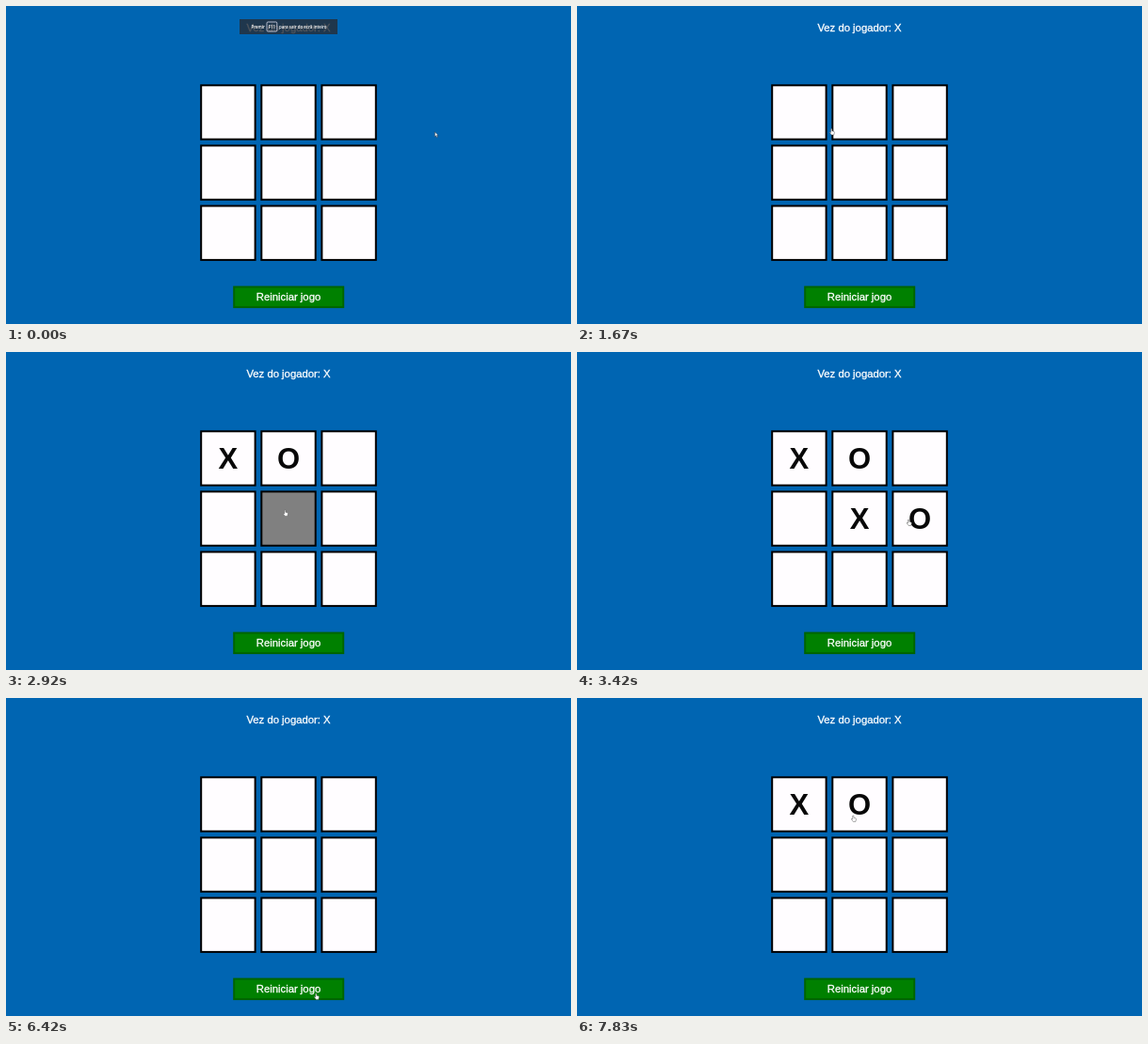
Recreate the animation shown at these times as an HTML page with a canvas. Size 600 px wide and 338 px high, loop 8 s.

```html
<!DOCTYPE html>
<html lang="pt">
<head>
<meta charset="utf-8">
<title>Jogo do galo</title>
<style>
  html, body { margin: 0; width: 100%; height: 100%; overflow: hidden; background: #0065b2; }
  canvas { display: block; width: 600px; height: 338px; }
</style>
</head>
<body>
<canvas id="stage" width="600" height="338"></canvas>
<script>
const ctx = document.getElementById('stage').getContext('2d');
const LOOP = 8000;
const STEP = 1000 / 12;
const TRAVEL = 300;
const SANS = '"Liberation Sans", Arial, sans-serif';
const LABEL = '11.3px ' + SANS;
const MARK = 'bold 31px ' + SANS;
const TOAST = '600 4.4px "Open Sans", sans-serif';

// The pointer glides to a spot, pauses there and clicks.
const visit = (x, y, arrive, pause = 125) => ({ x, y, arrive, click: arrive + pause });
const start = { x: 457, y: 137, click: 0 };
const visits = [
  visit(238, 133, 1783),
  visit(294, 128, 2250),
  visit(297, 171, 2900),
  visit(351, 174, 3250),
  visit(368, 240, 3700, 460),
  visit(330, 317, 6250),
  visit(238, 133, 7083),
  visit(294, 128, 7417)
];

const inside = (p, r) => p.x >= r.x && p.x <= r.x + r.w && p.y >= r.y && p.y <= r.y + r.h;

// The winning message pushes the board and the button down.
function layout(won) {
  const top = won ? 88.3 : 83.3;
  const cells = Array.from({ length: 9 }, (_, i) => ({
    x: 206.2 + i % 3 * 64.1, y: top + Math.floor(i / 3) * 64.1, w: 59.4, h: 59.4
  }));
  return { cells, button: { x: 241.2, y: won ? 299.3 : 297.6, w: 118, h: 23.5 } };
}

const board = layout(false).cells;
const cellAt = p => board.findIndex(cell => inside(p, cell));

function isDiagonalWin(marks) {
  return marks[4] !== undefined && marks[0] === marks[4] && marks[4] === marks[8];
}

function gameAt(time) {
  let marks = [], turn = 'X', hover = -1;
  for (const stop of visits) {
    const cell = cellAt(stop);
    if (time >= stop.click) {
      if (cell < 0) {
        marks = [];
        turn = 'X';
      } else {
        marks[cell] = turn;
        turn = turn === 'X' ? 'O' : 'X';
      }
    } else if (time >= stop.arrive) {
      hover = cell;
    }
  }
  return { marks, turn, hover, won: isDiagonalWin(marks) };
}

function pointerAt(time) {
  let from = start, pos = start;
  for (const stop of visits) {
    const leave = Math.max(from.click, stop.arrive - TRAVEL);
    if (time < leave) break;
    const k = Math.min(1, (time - leave) / (stop.arrive - leave));
    const ease = 1 - (1 - k) ** 2;
    pos = { x: from.x + (stop.x - from.x) * ease, y: from.y + (stop.y - from.y) * ease };
    from = stop;
  }
  return pos;
}

function text(str, x, y, font, { color = '#fff', align = 'center', weight = 0 } = {}) {
  ctx.font = font;
  ctx.textAlign = align;
  ctx.fillStyle = ctx.strokeStyle = color;
  ctx.fillText(str, x, y);
  if (weight) {
    ctx.lineWidth = weight;
    ctx.strokeText(str, x, y);
  }
}

const label = (str, y) => text(str, 300, y, LABEL, { weight: 0.3 });

function box(r, fill, border) {
  ctx.fillStyle = border;
  ctx.fillRect(r.x, r.y, r.w, r.h);
  ctx.fillStyle = fill;
  ctx.fillRect(r.x + 2, r.y + 2, r.w - 4, r.h - 4);
}

const arrow = new Path2D('M0 0V17L4 13.5L7 20L10 18.5L7 12.5H12Z');
const hand = new Path2D('M5 1.5Q7 -.5 9 1.5V8L16 10Q18 11 17.5 14L15.5 22H7L1 14Q0 11 3 12L5 14Z');

function drawPointer(p, isHand) {
  const shape = isHand ? hand : arrow;
  ctx.save();
  ctx.translate(p.x - (isHand ? 2.8 : 1.6), p.y - 3.2);
  ctx.scale(0.3, 0.3);
  ctx.lineWidth = 1.7;
  ctx.strokeStyle = isHand ? '#555' : '#234';
  ctx.fillStyle = '#fff';
  ctx.fill(shape);
  ctx.stroke(shape);
  ctx.restore();
}

function drawToast(alpha) {
  if (alpha <= 0) return;
  ctx.save();
  ctx.globalAlpha = alpha;
  ctx.fillStyle = 'rgba(38, 46, 56, 0.82)';
  ctx.fillRect(248, 14, 104, 16);
  text('Premir', 260.5, 23.8, TOAST, { align: 'left' });
  text('F11', 282.4, 23.8, TOAST);
  text('para sair do ecrã inteiro', 290, 23.8, TOAST, { align: 'left' });
  ctx.strokeStyle = '#dde';
  ctx.lineWidth = 0.8;
  ctx.beginPath();
  ctx.roundRect(277, 17, 10.8, 10, 1.2);
  ctx.stroke();
  ctx.restore();
}

function draw(time) {
  const { marks, turn, hover, won } = gameAt(time);
  const { cells, button } = layout(won);
  const pointer = pointerAt(time);

  ctx.fillStyle = '#0065b2';
  ctx.fillRect(0, 0, 600, 338);
  label('Vez do jogador: ' + turn, won ? 25.7 : 27.1);
  if (won) label('Jogador: X venceu!', 62.1);

  cells.forEach((cell, i) => {
    box(cell, hover === i ? '#808080' : '#fffdff', '#000');
    if (marks[i]) text(marks[i], cell.x + cell.w / 2, cell.y + 40.3, MARK, { color: '#080808' });
  });

  box(button, '#008000', '#006400');
  label('Reiniciar jogo', button.y + 15.6);

  drawToast(Math.min(1, (1417 - time) / 830));
  drawPointer(pointer, [...cells, button].some(r => inside(pointer, r)));
}

function tick() {
  const now = performance.now() % LOOP;
  draw(Math.floor((now + 5) / STEP) * STEP % LOOP);
  requestAnimationFrame(tick);
}
tick();
</script>
</body>
</html>
```
